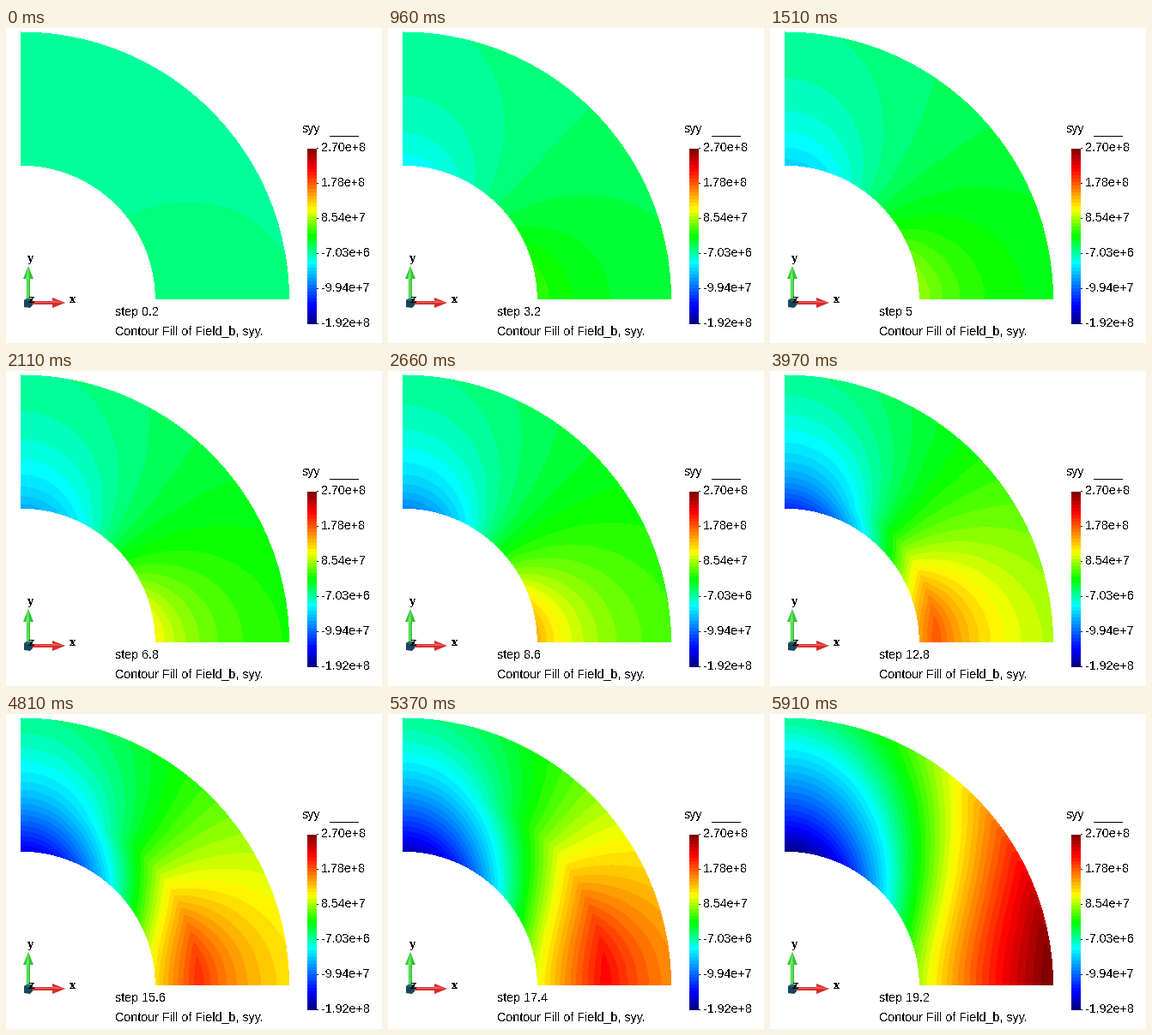
Write a matplotlib script that moves like this. It is 438x368 px and loops after 6.11 s.

```python
import numpy as np
import matplotlib.pyplot as plt
from matplotlib.animation import FuncAnimation
from matplotlib.colors import LinearSegmentedColormap
from matplotlib.patches import Polygon, Rectangle

W, H, DPI = 438, 368, 64
FRAMES, INTERVAL = 235, 26
STEP_MS, LAST_STEP = 62.1, 96

# Thick cylinder under inner pressure, elastic-perfectly plastic (MPa)
SHEAR = 240 / np.sqrt(3)            # half of the plane-strain yield limit
LOW, HIGH = -191.83, 270.17
BAND, BAND_START = 9.07, 1.3

# Ring in pixels: centre and outer radius; the inner one is half of it
CX, CY, OUTER = 17.5, 317, 312.5
LEFT, RIGHT, TOP, BOTTOM = 17, 330, 4, 317

CMAP = LinearSegmentedColormap.from_list("stress", [
    (0, "#000080"), (0.1, "#0000ff"), (0.35, "#00ffff"), (0.5, "#00ff00"),
    (0.655, "#ffff00"), (0.885, "#ff0000"), (1, "#800000")], N=1024)

gx, gy = np.meshgrid(np.arange(LEFT, RIGHT) + 0.5 - CX,
                     CY - 0.5 - np.arange(TOP, BOTTOM))
radius = np.hypot(gx, gy) / (OUTER / 2)
ring = (radius >= 1) & (radius <= 2)
r = np.clip(radius, 1, 2)
cos2 = gx**2 / (gx**2 + gy**2)


def pressure(front):
    """Inner pressure that brings the plastic front to this radius."""
    return SHEAR * (1 - front**2 / 4 + 2 * np.log(front))


FRONTS = np.linspace(1, 2, 4001)
LOADS = pressure(FRONTS)


def stress_yy(load):
    front = np.interp(load, LOADS, FRONTS)
    k = min(load / 3, SHEAR / 4) * front**2
    inside = 2 * SHEAR * np.log(r) - load
    plastic = r < front
    radial = np.where(plastic, inside, k * (1 - 4 / r**2))
    hoop = np.where(plastic, inside + 2 * SHEAR, k * (1 + 4 / r**2))
    return radial * (1 - cos2) + hoop * cos2


def banded(stress):
    middle = np.floor((stress - BAND_START) / BAND) + 0.5
    return CMAP((BAND_START + middle * BAND - LOW) / (HIGH - LOW))


def contour(load):
    rgba = banded(stress_yy(load))
    rgba[..., 3] = ring
    return rgba


fig = plt.figure(figsize=(W / DPI, H / DPI), dpi=DPI, facecolor="white")
ax = fig.add_axes([0, 0, 1, 1])


def label(x, y, s, size=14.2, **kw):
    kw = {"family": "Liberation Sans", "color": "black", **kw}
    return ax.text(x, y, s, fontsize=size * 72 / DPI, va="baseline",
                   antialiased=False, **kw)


def rect(x, y, w, h, color):
    ax.add_patch(Rectangle((x, y), w, h, color=color, lw=0, antialiased=False))


def poly(points, color):
    ax.add_patch(Polygon(points, color=color, lw=0))


def picture(rgba, x0, x1, y0, y1):
    return ax.imshow(rgba, extent=(x0, x1, y1, y0), interpolation="nearest",
                     aspect="auto")


field = picture(contour(2), LEFT, RIGHT, TOP, BOTTOM)

# Colour scale
picture(banded(np.linspace(HIGH, LOW, 205)[:, None]), 351, 362, 141, 346)
label(345, 122, "syy")
rect(377, 126, 34, 1, "black")
for i, value in enumerate(np.linspace(HIGH, LOW, 6)):
    rect(362, 140 + 41 * i, 2, 1, "black")
    label(367, 144 + 41 * i, f"{value * 1e6:.2e}".replace("+0", "+"))

# Axis triad
rect(24, 292, 4, 25, "#38c838")
rect(25, 292, 1, 25, "#7cf07c")
poly([(26, 278), (20, 293), (32, 293)], "#2fc52f")
poly([(26, 278), (23, 293), (27, 293)], "#6ae86a")
rect(30, 319, 25, 4, "#d83030")
rect(30, 320, 25, 1, "#f06060")
poly([(69, 321), (54, 315), (54, 327)], "#d42c2c")
poly([(69, 321), (54, 318), (54, 321)], "#ee5c5c")
poly([(21, 318), (24, 316), (31, 316), (31, 324), (28, 327), (21, 326)],
     "#17475c")
poly([(21, 318), (24, 316), (31, 316), (28, 319)], "#2a6680")
for x, y, name in [(25.5, 273, "y"), (74.5, 321, "x"), (26, 321, "z")]:
    label(x, y, name, 12, family="DejaVu Serif", weight="bold")

step_text = label(127, 336, "")
label(127, 359, "Contour Fill of Field_b, syy.")

ax.set_xlim(0, W)
ax.set_ylim(H, 0)
ax.axis("off")


def update(n):
    count = min(int(n * INTERVAL / STEP_MS) + 1, LAST_STEP)
    field.set_data(contour(2 * count))
    step_text.set_text(f"step {count / 5:g}")
    return field, step_text


ani = FuncAnimation(fig, update, frames=FRAMES, interval=INTERVAL,
                    repeat=True, repeat_delay=0)
plt.show()
```
